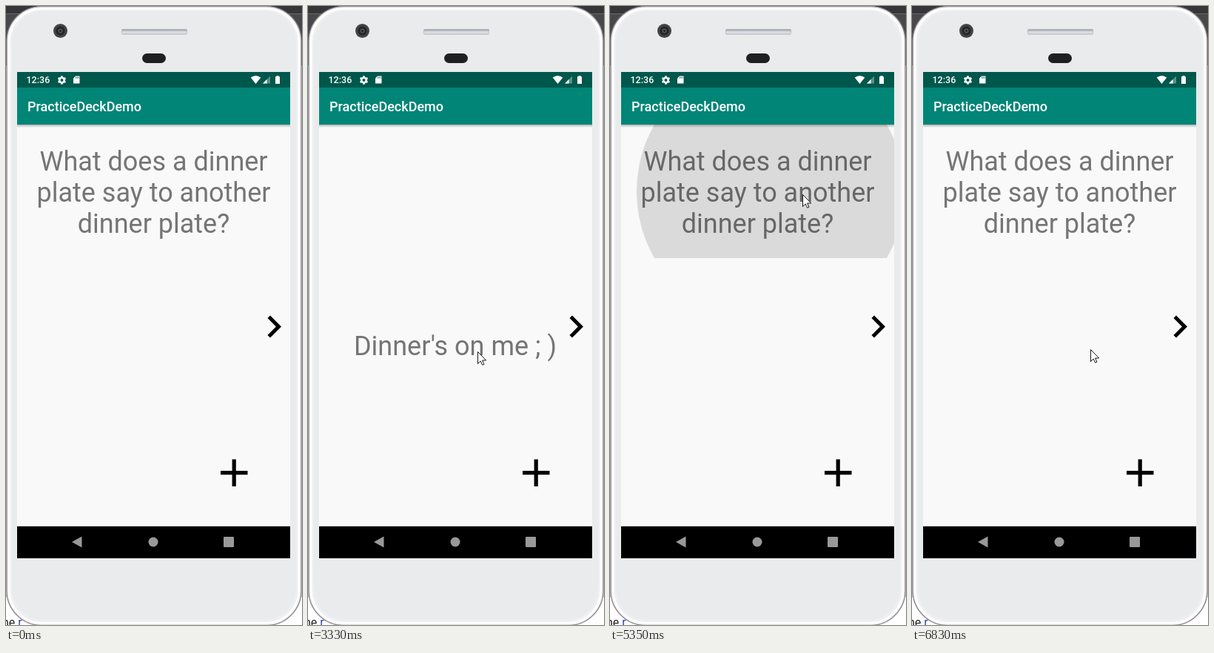
Write an HTML page that moves like this. It is 400 by 835 pixels and loops after 8 s.

```html
<!DOCTYPE html>
<html lang="en">
<head>
<meta charset="utf-8">
<title>Flashcards</title>
<style>
html, body { margin: 0; width: 100%; height: 100%; overflow: hidden; background: #fff; }
svg { display: block; width: 100%; height: 100%; }
text { font-family: Roboto, Arial, sans-serif; }
.card { font-size: 36px; fill: #757575; text-anchor: middle; }
.bar { font-weight: 500; fill: #fff; }
</style>
</head>
<body>
<svg viewBox="0 0 400 835">
  <defs>
    <linearGradient id="shade" x2="0" y2="1">
      <stop offset="0" stop-color="#000" stop-opacity=".28"/>
      <stop offset="1" stop-color="#000" stop-opacity="0"/>
    </linearGradient>
    <linearGradient id="slot" x2="0" y2="1">
      <stop offset="0" stop-color="#a9adb4"/>
      <stop offset="1" stop-color="#cdd1d7"/>
    </linearGradient>
    <clipPath id="cardBox"><rect x="36" y="160" width="348" height="180"/></clipPath>
  </defs>

  <!-- desktop behind the phone -->
  <rect width="400" height="835" fill="#fff"/>
  <rect width="400" height="80" fill="#48484a"/>
  <rect width="400" height="10" fill="#363638"/>
  <rect y="10" width="400" height="1" fill="#6a6a6c"/>
  <rect y="80" width="400" height="716" fill="#d5d3d5"/>
  <rect y="796" width="400" height="1" fill="#a0a0a0"/>
  <text x="-5" y="837" font-size="16" fill="#222">he <tspan fill="#2a3fb0">r</tspan></text>

  <!-- phone body -->
  <rect x="1" y=".5" width="398" height="835" rx="47" fill="#f6f6f7" stroke="#8d878b" stroke-width="1.4"/>
  <rect x="4.5" y="4" width="391" height="828" rx="44" fill="#eeeff0" stroke="#fff" stroke-width="2"/>
  <rect x="8" y="7" width="384" height="821" rx="42" fill="#e9ebec"/>
  <rect x="156" y="31" width="89" height="8" rx="2" fill="url(#slot)"/>
  <rect x="157" y="34" width="87" height="3" fill="#d9dce1"/>
  <rect x="184" y="64" width="32" height="13" rx="6.5" fill="#202022"/>
  <circle cx="73.5" cy="33.5" r="9.5" fill="#434345"/>
  <circle cx="73.5" cy="33.5" r="6" fill="#252527"/>
  <circle cx="73.5" cy="33.5" r="3" fill="#59595c"/>
  <circle cx="73.5" cy="33.5" r="1.5" fill="#202022"/>

  <!-- screen -->
  <rect x="15" y="89" width="369" height="656" fill="#f9f9f9"/>
  <g id="ripple" clip-path="url(#cardBox)"><circle cx="217" cy="250" r="181" fill="#dadada"/></g>
  <rect x="15" y="160" width="369" height="4" fill="url(#shade)"/>
  <rect x="15" y="89" width="369" height="21" fill="#00574b"/>
  <rect x="15" y="110" width="369" height="50" fill="#008577"/>
  <text class="bar" x="27.5" y="104" font-size="12.5">12:36</text>
  <text class="bar" x="29" y="142" font-size="18">PracticeDeckDemo</text>

  <!-- status icons -->
  <g fill="#fff">
    <circle cx="75.5" cy="100" r="3.2" fill="none" stroke="#fff" stroke-width="2.5"/>
    <g id="teeth"></g>
    <path d="M94 94.500H99.500V104.500H91V97.500Z"/>
    <path d="M94.500 95.500v2.200M96.300 95.500v2.200M98.100 95.500v2.200" stroke="#00574b" stroke-width=".8"/>
    <path d="M337.500 105 330.700 96.500Q337.500 91.500 344.300 96.500Z"/>
    <path d="M357 94.500V104.500H347Z" opacity=".35"/>
    <path d="M352.500 99V104.500H347Z"/>
    <path d="M365.500 95.300v-1.300h3v1.300h1.500V105h-6V95.300Z"/>
  </g>

  <g id="question" class="card">
    <text x="199.500" y="222">What does a dinner</text>
    <text x="199.500" y="264">plate say to another</text>
    <text x="199.500" y="306">dinner plate?</text>
  </g>
  <text id="answer" class="card" x="199" y="470.500">Dinner's on me ; )</text>

  <path transform="translate(332 402.500) scale(2.500)" d="M10 6 8.590 7.410 13.170 12 8.590 16.590 10 18 16 12Z"/>
  <path d="M290 629.700H326.500M308.200 611.500V648" stroke="#000" stroke-width="5.200"/>

  <!-- navigation bar -->
  <rect x="15" y="701" width="369" height="1" fill="#d8d8d8"/>
  <rect x="15" y="702" width="369" height="43" fill="#000"/>
  <g fill="#999">
    <path d="M89 723 102.500 715.500V730.500Z"/>
    <circle cx="199" cy="723" r="6.500"/>
    <rect x="294" y="716" width="14" height="14" rx="1"/>
  </g>

  <path id="cursor" d="M.5.500V16.500L4.200 13 6.600 18.200 8.900 17.200 6.600 12H11.700Z" fill="#fff" stroke="#000" stroke-width=".9"/>
</svg>
<script>
const LOOP = 8000;
const el = id => document.getElementById(id);
const show = (id, on) => el(id).setAttribute('visibility', on ? 'visible' : 'hidden');

el('teeth').innerHTML = Array.from({ length: 6 }, (_, i) =>
  `<rect x="74.200" y="94.300" width="2.600" height="3" transform="rotate(${i * 60} 75.500 100)"/>`).join('');

// time, x, y of the pointer tip; each place holds until the next
const path = [
  [860, 293, 760], [990, 280, 541], [1130, 265, 388], [1250, 262, 358],
  [1390, 260, 318], [1510, 259, 288], [1630, 262, 274], [2770, 256, 325],
  [2920, 238, 439], [3060, 231, 463], [3180, 230, 466], [3330, 229, 466],
  [4610, 232, 460], [4760, 256, 313], [4910, 260, 254], [5750, 259, 300],
  [5870, 257, 388], [6030, 247, 452], [6170, 243, 462], [6290, 241, 463]
];
const flips = [2360, 3890, 5470, 6830];
const press = [5350, 5470];

function draw(t) {
  const asking = flips.filter(f => t >= f).length % 2 === 0;
  const pressed = t >= press[0] && t < press[1];
  show('question', asking);
  show('answer', !asking);
  show('ripple', pressed);
  el('question').style.fill = pressed ? '#676767' : '';

  const spot = path.filter(p => t >= p[0]).pop();
  show('cursor', spot);
  if (spot) el('cursor').setAttribute('transform', `translate(${spot[1]} ${spot[2]})`);
}

const start = performance.now();
function tick() {
  draw((performance.now() - start) % LOOP);
  requestAnimationFrame(tick);
}
tick();
</script>
</body>
</html>
```
